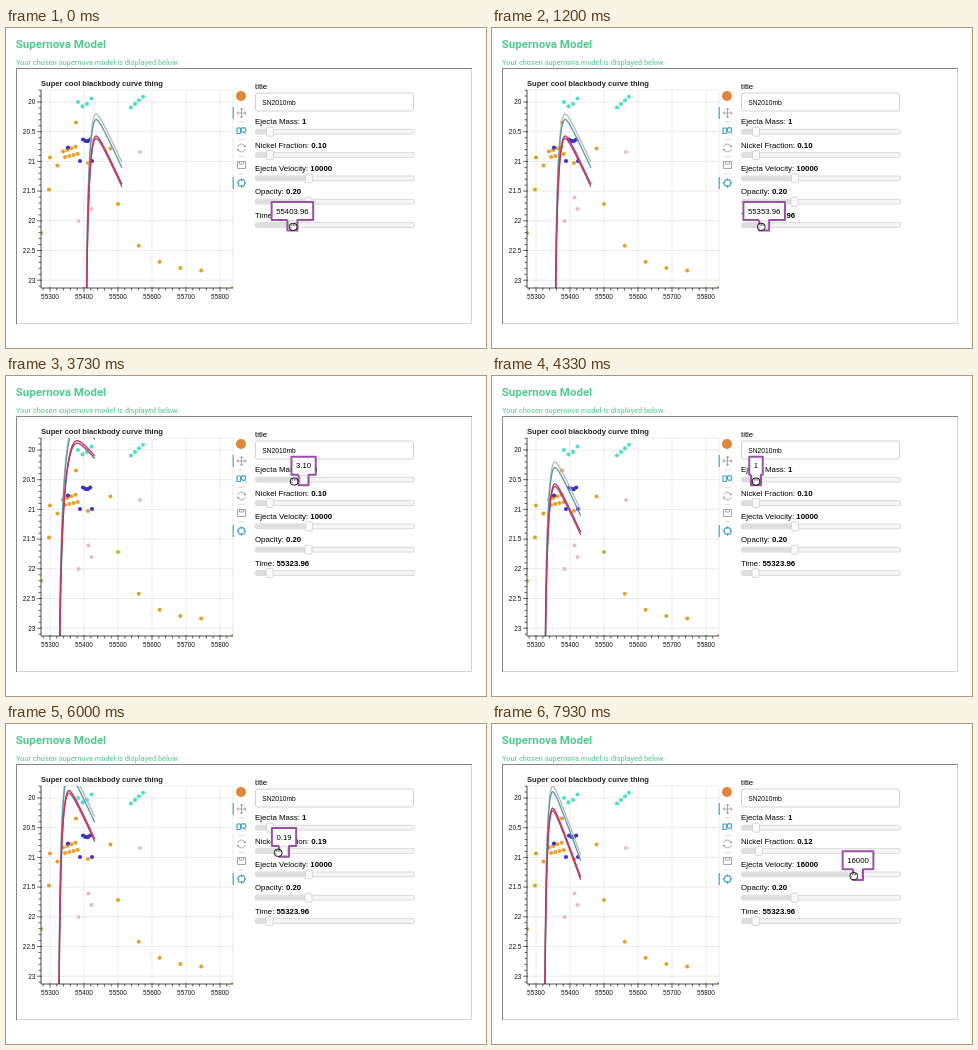
Recreate the animation shown at these times as an HTML page with a canvas. Size 480 by 320 pixels, loop 8000 ms.

```html
<!DOCTYPE html>
<html lang="en">
<head>
<meta charset="utf-8">
<title>Supernova Model</title>
<style>
  html, body { margin: 0; width: 100%; height: 100%; overflow: hidden; background: #fff; }
  canvas { display: block; width: 480px; height: 320px; }
</style>
</head>
<body>
<canvas id="stage" width="480" height="320"></canvas>
<script>
const ctx = document.getElementById('stage').getContext('2d');
const LOOP = 8000;
const LEAD = 90; // ms by which the pointer runs ahead of the handle
const SANS = '"Liberation Sans", Arial, sans-serif';
const PLOT = { left: 35, top: 62, right: 227, bottom: 260 };
const dayX = day => 44 + (day - 55300) * 0.34;
const magY = mag => 74 + (mag - 20) * 59.4;

const clamp01 = u => Math.min(1, Math.max(0, u));
const smooth = u => u * u * (3 - 2 * u);
const mix = (a, b, u) => a + (b - a) * u;
const range = (n, make) => Array.from({ length: n }, (_, i) => make(i));

const plain = v => v.toFixed(0);
const cents = v => v.toFixed(2);
const shortest = v => Math.abs(v - Math.round(v)) < 0.001 ? plain(v) : cents(v);

// Each drag goes steadily from `from` to `peak`, pauses, then eases back to `rest`.
const sliders = [
  { name: 'Ejecta Mass', zero: 232, scale: 16, step: 0.1, format: shortest, shown: [2740, 4640],
    from: 1, peak: 4.1, rest: 1, out: [3000, 3470], back: [3600, 4330] },
  { name: 'Nickel Fraction', zero: 248.4, scale: 156, step: 0.01, format: cents, shown: [4860, 6520],
    from: 0.1, peak: 0.47, rest: 0.12, out: [4900, 5600], back: [5680, 6270] },
  { name: 'Ejecta Velocity', zero: 198, scale: 0.0105, step: 1000, format: plain, shown: [6860, LOOP],
    from: 10000, peak: 17000, rest: 14000, out: [7330, 7650], back: [7770, 8700] },
  { name: 'Opacity', zero: 262.5, scale: 200, step: 0.01, format: cents, from: 0.2 },
  { name: 'Time', zero: 263.6, scale: 0.285, step: 10, base: 55323.96, format: cents, shown: [0, 2600],
    from: 80, peak: 150, rest: 0, out: [70, 600], back: [750, 1600] }
];
sliders.forEach((s, i) => { s.y = 103.7 + i * 23.33; });
sliders[0].zero = 248;
const drags = sliders.filter(s => s.shown).sort((a, b) => a.shown[0] - b.shown[0]);

function dragged(s, t) {
  if (!s.shown) return s.from;
  const along = ([start, end]) => clamp01((t - start) / (end - start));
  const u = along(s.back);
  return mix(mix(s.from, s.peak, along(s.out)), s.rest, 1 - (1 - u) ** 2);
}
const snapped = (s, t) => Math.round(dragged(s, t) / s.step + 1e-6) * s.step;
const handleX = (s, v) => s.zero + v * s.scale;

function pointer(t) {
  const spot = s => [handleX(s, dragged(s, t + LEAD)), s.y + 1.5];
  const next = drags.findIndex(s => t < s.shown[1]);
  const [x, y] = spot(drags[next]);
  if (next === 0) return [x, y];
  const previous = drags[next - 1], [px, py] = spot(previous);
  const u = smooth(clamp01((t - previous.shown[1]) / (drags[next].shown[0] - previous.shown[1])));
  return [mix(px, x, u), mix(py, y, u)];
}

const dots = [
  ['#4fe0c6', [
    ...range(4, i => [72 + 4.5 * i, 74 + 4.5 * Math.sin(1.35 * i)]),
    ...range(4, i => [125 + 4 * i, 79.5 - 3.6 * i])]],
  ['#efb9c6', [[134, 124], [82.5, 169.5], [85.5, 181], [72.5, 193]]],
  ['#e6a12c', [
    ...range(8, i => [57 + 2.1 * i, i % 2 ? 129.5 - 0.5 * i : 123.5 - 0.8 * i]),
    ...range(5, i => [112 + 20.8 * i, 244 - 68 * Math.exp(-0.95 * i)]),
    [44, 129.5], [51.5, 137.5], [43, 161.5], [35, 205], [70, 94.5], [82, 135], [104.5, 120.5], [227, 260]]],
  ['#3b32c4', [
    ...range(3, i => [62 + 12 * i, Math.min(133, 119.5 + 14 * i)]),
    ...range(4, i => [77 + 2.4 * i, 112.5 - Math.cos(2 * i)])]]
];
const bands = [['#b3c0b0', 86], ['#5f97ae', 91.5], ['#94507f', 110.5], ['#cb3156', 108]];

function text(str, x, y, font, color = '#000', align = 'left') {
  ctx.font = font;
  ctx.fillStyle = color;
  ctx.textAlign = align;
  ctx.fillText(str, x, y);
  return ctx.measureText(str).width;
}
function line(color, width, ...p) {
  ctx.strokeStyle = color;
  ctx.lineWidth = width;
  ctx.beginPath();
  for (let i = 0; i < p.length; i += 2) ctx.lineTo(p[i], p[i + 1]);
  ctx.stroke();
}
function arc(x, y, r, from = 0, to = 7) {
  ctx.beginPath();
  ctx.arc(x, y, r, from, to);
}
function disc(x, y, r, color) {
  arc(x, y, r);
  ctx.fillStyle = color;
  ctx.fill();
}
function box(x, y, w, h, r, fill, stroke) {
  ctx.beginPath();
  ctx.roundRect(x, y, w, h, r);
  ctx.fillStyle = fill;
  ctx.fill();
  if (!stroke) return;
  ctx.strokeStyle = stroke;
  ctx.lineWidth = 0.8;
  ctx.stroke();
}

function drawPage() {
  ctx.fillStyle = '#fff';
  ctx.fillRect(0, 0, 480, 320);
  text('Supernova Model', 9.8, 20.4, 'bold 11.5px Roboto, sans-serif', '#4ecb91');
  text('Your chosen supernova model is displayed below.', 10, 37, '500 7.35px Roboto, sans-serif', '#6fd0a3');
  line('#858585', 1, 10.5, 296, 10.5, 40.5, 466, 40.5);
  line('#d4d4d4', 1, 465.5, 41, 465.5, 295.5, 11, 295.5);
}

function drawGrid() {
  const { left, top, right, bottom } = PLOT;
  text('Super cool blackbody curve thing', 35, 58.2, 'bold 7.6px ' + SANS, '#222');
  for (let day = 55300; day <= 55800; day += 100) line('#e6e6e6', 0.8, dayX(day), top, dayX(day), bottom);
  for (let mag = 20; mag <= 23; mag += 0.5) line('#e6e6e6', 0.8, left, magY(mag), right, magY(mag));
  line('#e6e6e6', 0.8, left, top, right, top, right, bottom);
}

function drawTicks() {
  const { left, top, right, bottom } = PLOT, font = '6.4px ' + SANS;
  line('#222', 0.8, left, top, left, bottom, right, bottom);
  for (let day = 55280; day <= 55820; day += 20) {
    const major = day % 100 === 0, x = dayX(day);
    line('#222', 0.7, x, bottom - (major ? 1 : 0), x, bottom + (major ? 3.8 : 2.5));
    if (major) text(String(day), x, 271, font, '#111', 'center');
  }
  for (let tenth = 198; tenth <= 231; tenth++) {
    const major = tenth % 5 === 0, y = magY(tenth / 10);
    line('#222', 0.7, left + (major ? 1 : 0), y, left - (major ? 3.8 : 2.5), y);
    if (major) text(String(tenth / 10), 29.3, y + 2.3, font, '#111', 'right');
  }
}

// Light curve: steep logarithmic rise to the peak, then a nearly straight decline.
function drawData(mass, nickel, velocity, start) {
  const { left, top, right, bottom } = PLOT;
  const speed = velocity / 10000;
  const peakX = 10.8 * Math.sqrt(mass / speed);
  const lift = 148.5 * Math.log10(nickel / 0.1) + 88 * Math.log10(mass) + 59 * Math.log10(speed);
  ctx.save();
  ctx.beginPath();
  ctx.rect(left, top, right - left, bottom - top);
  ctx.clip();
  for (const [color, points] of dots)
    for (const [x, y] of points) disc(x, y, 2.05, color);
  ctx.lineJoin = 'round';
  for (const [color, peak] of bands) {
    const path = [];
    for (let x = 0.6; x <= 36.8; x += 0.4) {
      const p = x / peakX;
      const drop = p < 1 ? 129 * (p - 1 - Math.log(p)) : 23.6 * (p - 1) ** 2 / (p - 0.6);
      path.push(dayX(start) + x, peak - lift + drop);
    }
    line(color, 1.35, ...path);
  }
  ctx.restore();
}

function drawToolbar() {
  const gray = '#a3a6a8', x = 235.5;
  disc(235, 68, 5, '#e0863a');
  for (let y = 94; y < 150; y += 17.3) line('#d5d5d5', 0.8, x - 3, y, x + 3, y);
  for (const y of [85, 155]) line('#4aa5cc', 1.2, 227.2, y - 6, 227.2, y + 6);
  for (let i = 0; i < 4; i++) {
    ctx.save();
    ctx.translate(x, 85);
    ctx.rotate(i * Math.PI / 2);
    line(gray, 1, 0, 0, 4.5, 0);
    line(gray, 1, 3, -1.8, 4.8, 0, 3, 1.8);
    ctx.translate(0, 0);
    ctx.restore();
    ctx.save();
    ctx.translate(x, 155);
    ctx.rotate(i * Math.PI / 2);
    line(gray, 1, 2, 0, 5, 0);
    ctx.restore();
  }
  arc(x, 155, 3.4);
  ctx.stroke();
  ctx.strokeRect(x - 4.5, 100, 3.5, 5.5);
  arc(x + 2, 102, 2.3);
  ctx.stroke();
  line(gray, 1, x + 3, 104, x + 5, 106.5);
  for (const a of [0.3, 0.3 + Math.PI]) {
    arc(x, 120, 3.8, a, a + 2.4);
    ctx.stroke();
    disc(x + 3.8 * Math.cos(a + 2.4), 120 + 3.8 * Math.sin(a + 2.4), 1.1, gray);
  }
  ctx.strokeRect(x - 4, 133.5, 8, 7);
  ctx.strokeRect(x - 2, 133.5, 4, 2.5);
}

function drawSlider(s, value) {
  const { name, y, base = 0, format } = s, hx = handleX(s, value);
  const labelWidth = text(name + ': ', 249, y - 7.4, '7.85px ' + SANS);
  text(format(base + value), 249 + labelWidth, y - 7.4, 'bold 7.85px ' + SANS);
  box(249.4, y - 2.4, 159, 4.8, 1.6, '#f5f5f5', '#d2d2d2');
  box(249.8, y - 2, hx - 249.8, 4, 1.2, '#dedede');
  box(hx - 3.5, y - 4.5, 7, 9, 1.6, '#fafafa', '#cfcfcf');
}

function drawTooltip(s, value) {
  const { y, base = 0, format } = s, hx = handleX(s, value);
  const label = format(base + value), font = '7.75px ' + SANS;
  ctx.font = font;
  const half = ctx.measureText(label).width / 2 + 4.6;
  const top = y - 23, shoulder = y - 5, foot = y + 5.6, neck = 5;
  ctx.fillStyle = '#fff';
  ctx.fillRect(hx - half, top, half * 2, shoulder - top);
  ctx.lineJoin = 'round';
  line('#9b52a6', 2, hx - neck, shoulder, hx - half, shoulder, hx - half, top, hx + half, top,
    hx + half, shoulder, hx + neck, shoulder, hx + neck, foot, hx - neck, foot, hx - neck, shoulder);
  text(label, hx, y - 11.3, font, '#000', 'center');
}

function drawHand(x, y) {
  ctx.save();
  ctx.translate(x, y);
  ctx.beginPath();
  ctx.roundRect(-3.8, -3.2, 7.6, 7, 3);
  ctx.fillStyle = '#fff';
  ctx.fill();
  ctx.strokeStyle = '#111';
  ctx.lineWidth = 1;
  ctx.stroke();
  for (let fx = -1.4; fx < 3; fx += 1.6) line('#333', 0.7, fx, -2.6, fx, -0.6);
  line('#333', 0.7, -3.2, 0.4, -1.6, 1.4);
  ctx.restore();
}

function draw(t) {
  const values = sliders.map(s => snapped(s, t));
  const [mass, nickel, velocity, , time] = values;
  drawPage();
  drawGrid();
  drawData(mass, nickel, velocity, sliders[4].base + time);
  drawTicks();
  drawToolbar();
  text('title', 249, 61, '7.85px ' + SANS);
  box(249.5, 65, 158, 18, 2, '#fff', '#c6c6c6');
  text('SN2010mb', 256.3, 76.5, '6.7px ' + SANS);
  sliders.forEach((s, i) => drawSlider(s, values[i]));
  sliders.forEach((s, i) => {
    if (s.shown && t >= s.shown[0] && t < s.shown[1]) drawTooltip(s, values[i]);
  });
  drawHand(...pointer(t));
}

const origin = performance.now();
function tick() {
  draw((performance.now() - origin) % LOOP);
  requestAnimationFrame(tick);
}
tick();
</script>
</body>
</html>
```
